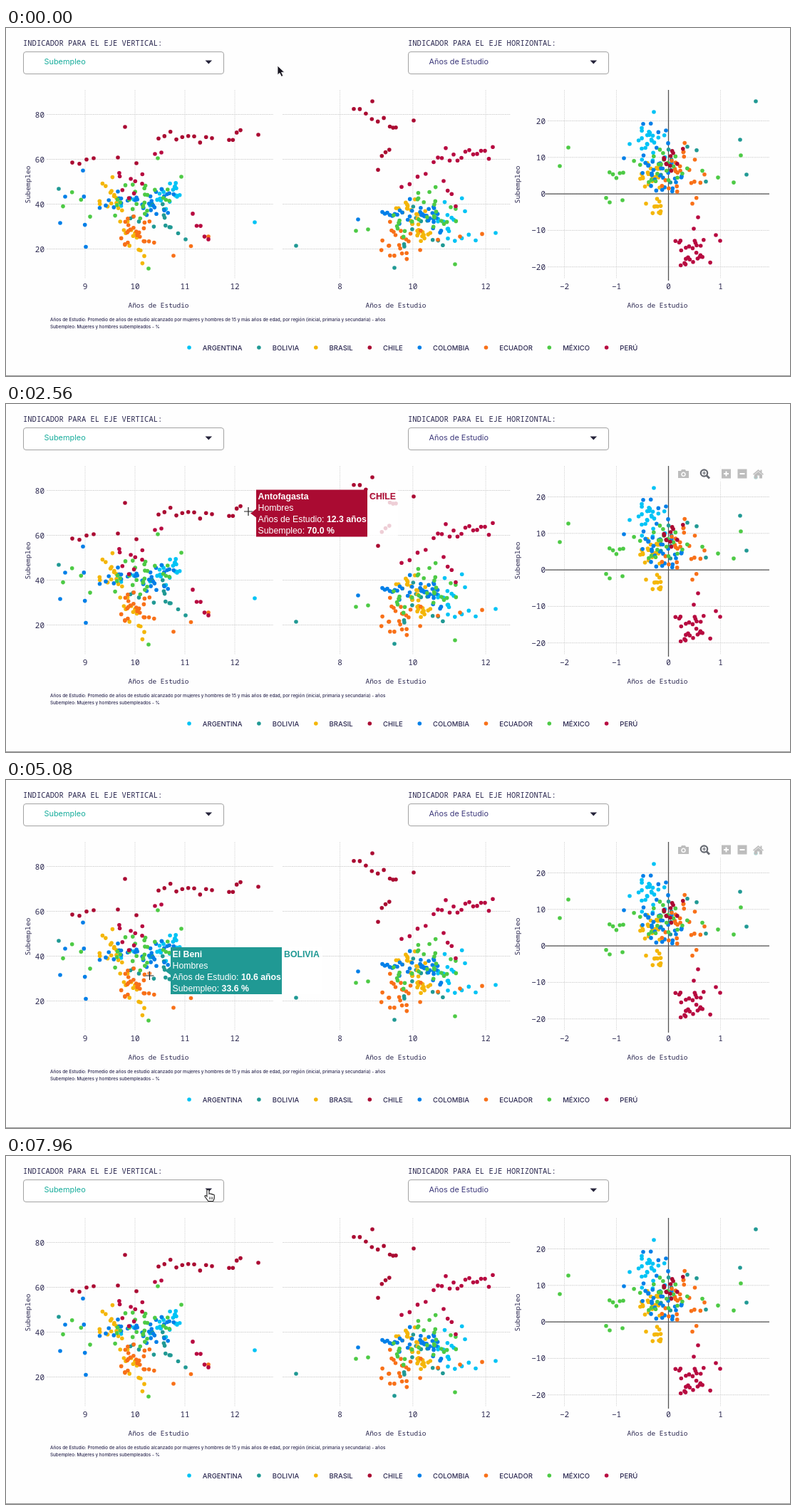
Recreate the animation shown at these times as an HTML page. Size 1100 by 489 pixels, loop 8000 ms.

```html
<!DOCTYPE html>
<html lang="es">
<head>
<meta charset="utf-8">
<title>Indicadores</title>
<style>
html, body { margin: 0; width: 100%; height: 100%; overflow: hidden; background: #fefefe; }
svg { display: block; width: 100vw; height: 100vh; }
text { fill: #2b2850; font-family: Inter, "Open Sans", sans-serif; font-weight: 500; }
.mono { font-family: "Noto Sans Mono", "DejaVu Sans Mono", monospace; }
.value { font-weight: 400; }
.mid { text-anchor: middle; }
.tip text { font: 12.3px "Liberation Sans", Arial, sans-serif; fill: #fff; }
.tip .bold { font-weight: bold; }
</style>
</head>
<body>
<svg id="stage" viewBox="0 0 1100 489">
  <g id="chart"></g>
  <g id="legend"></g>
  <g id="modebar" fill="#bdbdbd">
    <rect x="938" y="87" width="128" height="22" fill="#fff" opacity=".65"/>
    <path fill-rule="evenodd" d="M943 94h4l1-2h5l1 2h4v10h-15zM950.5 95.5a3.3 3.3 0 1 0 .01 0zM950.5 97a1.8 1.8 0 1 1-.01 0z"/>
    <g fill="none" stroke="#666a72"><circle cx="979.5" cy="97" r="4.7" stroke-width="2.2"/><path d="M983 100.5l4 4" stroke-width="2.8"/><path d="M977 97h5m-2.5-2.5v5" stroke-width="1.2"/></g>
    <path d="M1004 91.5h13v13h-13zM1026.5 91.5h13v13h-13z"/>
    <path d="M1007 98h7m-3.5-3.5v7M1029.5 98h7" stroke="#fff" stroke-width="2"/>
    <path d="M1048 98.5l7.5-6.5 3 2.6v-2h2v3.8l2.5 2.1-1 1.2-6.5-5.5-6.5 5.5zM1050 99.5l5.5-4.6 5.5 4.6v5h-4v-4h-3v4h-4z"/>
  </g>
  <g id="tip" class="tip"></g>
  <g id="arrow"><path d="M0 0V13l3-2.7 2.4 5 2.4-1.1-2.3-4.9h4.2z" fill="#17151f" stroke="#fff" stroke-width=".8"/></g>
  <g id="cross" fill="none"><path d="M-6 0H6M0-6V6" stroke="#fff" stroke-width="2.6" opacity=".7"/><path d="M-6 0H6M0-6V6" stroke="#222" stroke-width="1.2"/></g>
  <g id="hand"><path d="M-1.6 1.2Q0-1 1.5 1.2V6.2q1.5-1 2.5.4 1.5-.8 2.4.7 2-.6 2.4 1.2v4.2L7.2 16.5H.3L-4.6 9.8q.2-2 2.2-.9l.8.9z" fill="#fff" stroke="#222" stroke-width="1.1"/><path d="M2 10.5v3.5M4.2 10.5v3.5M6.3 10.5v3.5" stroke="#222" stroke-width=".8"/></g>
</svg>
<script>
const LOOP = 8000;
const COLORS = {
  ARGENTINA: '#00c3f5', BOLIVIA: '#209994', BRASIL: '#f4b608', CHILE: '#aa0b32',
  COLOMBIA: '#007fe8', ECUADOR: '#f87018', 'MÉXICO': '#4dca45', 'PERÚ': '#b70a40'
};
const byId = id => document.getElementById(id);
const out = [];
const text = (x, y, size, label, cls = '', extra = '') =>
  `<text x="${x}" y="${y}" font-size="${size}" class="${cls}" ${extra}>${label}</text>`;
const line = (x1, y1, x2, y2, color = '#dadada', extra = 'stroke-dasharray="2 .6"') =>
  `<path d="M${x1} ${y1}L${x2} ${y2}" stroke="${color}" ${extra}/>`;
const dot = (x, y, country) => `<circle cx="${x.toFixed(1)}" cy="${y.toFixed(1)}" r="2.8" fill="${COLORS[country]}"/>`;

// Seeded values that fall off evenly on both sides of zero
let seed = 71;
const random = () => (seed = (seed * 16807) % 2147483647) / 2147483647;
const spread = () => (random() + random() - 1) * 2.2;

function cloud(country, cx, cy, width, height, count) {
  for (let i = 0; i < count; i++) out.push(dot(cx + spread() * width, cy + spread() * height, country));
}

// Evenly spaced dots from one end to the other, shaken vertically
function trail(country, x1, y1, x2, y2, count, shake = 0) {
  for (let i = 0; i < count; i++) {
    const p = i / (count - 1);
    out.push(dot(x1 + (x2 - x1) * p, y1 + (y2 - y1) * p + spread() * shake, country));
  }
}

const point = (country, x, y) => out.push(dot(x, y, country));

function selector(x, heading, value, color) {
  out.push(text(x, 24.5, 10.5, heading, 'mono value'),
    `<rect x="${x + .5}" y="33.5" width="281" height="31" rx="3.5" fill="#fff" stroke="#a3a3a3"/>`,
    text(x + 29.5, 51, 10.9, value, 'value', `style="fill:${color}"`),
    `<path d="M${x + 255.5} 45.5h9.6l-4.8 5z" fill="#25233a"/>`);
}

const signed = value => String(value).replace('-', '−');

// x and y give the first tick's position, the gap, the first label, its step and the count
function axes(left, right, x, y, titleX, labelX) {
  for (let i = 0; i < x.count; i++) {
    const at = x.at + i * x.gap;
    out.push(line(at, 87, at, 352, '#e2e2e2'), text(at, 367, 11, signed(x.from + i * x.step), 'mono value mid'));
  }
  for (let i = 0; i < y.count; i++) {
    const at = y.at + i * y.gap;
    out.push(line(left, at, right, at));
    if (labelX) out.push(text(left - 3, at + 4, 11, signed(y.from + i * y.step), 'mono value', 'text-anchor="end"'));
  }
  out.push(text(titleX, 392.5, 9.45, 'Años de Estudio', 'mono value mid'));
  if (labelX) out.push(text(0, 0, 9.8, 'Subempleo', 'mono value mid', `transform="translate(${labelX} 220) rotate(-90)"`));
}

selector(24, 'INDICADOR PARA EL EJE VERTICAL:', 'Subempleo', '#18ad9c');
selector(564, 'INDICADOR PARA EL EJE HORIZONTAL:', 'Años de Estudio', '#3d397b');

const percent = { at: 121.5, gap: 63, from: 80, step: -20, count: 4 };
axes(57, 375, { at: 111, gap: 70, from: 9, step: 1, count: 4 }, percent, 214, 34);
axes(388, 708, { at: 468.5, gap: 102.3, from: 8, step: 2, count: 3 }, percent, 547);
axes(760, 1071, { at: 783.5, gap: 73, from: -2, step: 1, count: 4 },
  { at: 130.5, gap: 51.3, from: 20, step: -10, count: 5 }, 914, 720.5);
out.push(line(929.5, 87, 929.5, 355, '#555', 'stroke-width="1.3"'), line(757, 233.2, 1071, 233.2, '#555', 'stroke-width="1.3"'));

// Men
cloud('ARGENTINA', 230, 228, 10, 10, 14);
cloud('ARGENTINA', 200, 244, 20, 8, 7);
point('ARGENTINA', 349, 273);
cloud('BOLIVIA', 205, 265, 22, 21, 12);
trail('BOLIVIA', 231, 280, 252, 297, 3);
point('BOLIVIA', 74, 226);
cloud('BRASIL', 148, 233, 9, 11, 12);
trail('BRASIL', 155, 252, 194, 320, 16, 13);
trail('COLOMBIA', 108, 200, 112, 301, 4, 8);
cloud('COLOMBIA', 163, 243, 16, 8, 12);
cloud('COLOMBIA', 210, 246, 17, 12, 20);
trail('COLOMBIA', 76, 274, 83, 237, 2);
cloud('ECUADOR', 183, 289, 14, 13, 24);
trail('ECUADOR', 235, 320, 284, 293, 3);
trail('MÉXICO', 80, 238, 118, 266, 4, 12);
cloud('MÉXICO', 187, 238, 23, 19, 25);
trail('MÉXICO', 213, 183, 246, 209, 2);
point('MÉXICO', 200, 338);
trail('CHILE', 93, 190, 123, 182, 4, 4);
trail('CHILE', 157, 182, 183, 190, 2);
trail('CHILE', 214, 156, 289, 151, 10, 5);
trail('CHILE', 313, 155, 329, 145, 4, 4);
point('CHILE', 354, 150);
point('CHILE', 167, 139);
trail('PERÚ', 209, 177, 218, 175, 2);
cloud('PERÚ', 182, 228, 18, 17, 9);
trail('PERÚ', 262, 252, 284, 280, 5, 13);

// Women
cloud('ARGENTINA', 615, 264, 15, 14, 14);
trail('ARGENTINA', 620, 298, 659, 293, 5, 5);
point('ARGENTINA', 687, 288);
cloud('BOLIVIA', 578, 280, 18, 19, 12);
point('BOLIVIA', 407, 306);
point('BOLIVIA', 545, 337);
cloud('BRASIL', 567, 256, 10, 9, 13);
cloud('BRASIL', 582, 289, 9, 19, 15);
trail('COLOMBIA', 528, 262, 556, 259, 9, 3);
cloud('COLOMBIA', 590, 264, 18, 12, 27);
point('COLOMBIA', 494, 269);
cloud('ECUADOR', 555, 303, 18, 14, 23);
trail('ECUADOR', 606, 297, 668, 287, 3, 3);
cloud('MÉXICO', 600, 259, 20, 17, 22);
cloud('MÉXICO', 553, 273, 14, 12, 6);
trail('MÉXICO', 491, 285, 508, 283, 2);
point('MÉXICO', 630, 332);
trail('CHILE', 488, 118, 547, 134, 8, 8);
trail('CHILE', 522, 186, 543, 152, 5, 9);
point('CHILE', 514, 103);
point('CHILE', 572, 130);
trail('PERÚ', 555, 213, 600, 191, 5, 8);
trail('PERÚ', 606, 180, 683, 171, 15, 6);
trail('PERÚ', 614, 212, 631, 238, 4, 8);

// Gap between the two
cloud('ARGENTINA', 904, 160, 10, 20, 22);
trail('ARGENTINA', 875, 163, 909, 118, 3);
cloud('BOLIVIA', 926, 198, 13, 15, 6);
trail('BOLIVIA', 956, 163, 982, 202, 3, 10);
trail('BOLIVIA', 1030, 157, 1039, 206, 2);
point('BOLIVIA', 1052, 103);
cloud('BRASIL', 905, 201, 9, 10, 19);
cloud('BRASIL', 910, 245, 8, 13, 13);
trail('COLOMBIA', 894, 132, 926, 145, 4, 6);
cloud('COLOMBIA', 920, 202, 15, 19, 30);
point('COLOMBIA', 867, 183);
cloud('ECUADOR', 943, 200, 16, 22, 20);
trail('ECUADOR', 963, 254, 980, 201, 4, 6);
trail('MÉXICO', 777, 194, 789, 168, 2);
trail('MÉXICO', 842, 213, 866, 191, 6, 14);
trail('MÉXICO', 847, 245, 865, 242, 2);
trail('MÉXICO', 977, 204, 1021, 212, 3, 4);
cloud('MÉXICO', 920, 196, 21, 18, 20);
point('MÉXICO', 1031, 179);
cloud('CHILE', 938, 190, 11, 13, 11);
cloud('PERÚ', 961, 314, 15, 13, 25);
trail('PERÚ', 965, 282, 971, 266, 2);
trail('PERÚ', 996, 291, 1002, 299, 2);

out.push(
  text(62, 411.5, 6.3, 'Años de Estudio: Promedio de años de estudio alcanzado por mujeres y hombres de 15 y más años de edad, por región (inicial, primaria y secundaria) - años'),
  text(62, 422, 6.3, 'Subempleo: Mujeres y hombres subempleados - %'),
  line(0, 488.5, 1100, 488.5, '#9b9b9b', ''));
byId('chart').innerHTML = out.join('');

// Each entry starts a fixed gap after the end of the one before
let legendX = 257;
for (const country in COLORS) {
  byId('legend').insertAdjacentHTML('beforeend', dot(legendX, 449, country) + text(legendX + 18.8, 452.7, 9.5, country));
  legendX += 18.8 + byId('legend').lastElementChild.getComputedTextLength() + 23.5;
}

const HOVERS = [
  { from: 1840, to: 2900, x: 343, y: 153.5, country: 'CHILE', region: 'Antofagasta', years: '12.3', rate: '70.0' },
  { from: 3000, to: 3900, x: 253, y: 160, country: 'CHILE', region: 'Aysén', years: '11.0', rate: '67.7' },
  { from: 4700, to: 5700, x: 223, y: 268, country: 'BOLIVIA', region: 'El Beni', years: '10.6', rate: '33.6' },
  { from: 5700, to: 7100, x: 194.7, y: 274.5, country: 'BOLIVIA', region: 'Cochabamba', years: '10.2', rate: '31.5' }
];
// Pointer stops as [time, x, y]
const PATH = [
  [0, 381, 53], [1200, 381, 53], [1900, 355, 150], [2560, 340, 151], [3400, 251, 159], [3800, 250, 160],
  [5000, 201.5, 275], [6400, 197, 277], [7050, 197, 277], [7760, 283.5, 47], [LOOP, 283.5, 47]
];

function tooltip({ x, y, country, region, years, rate }) {
  const left = x + 8, right = left + 156, top = y - 33;
  const color = COLORS[country];
  const row = (i, label) => text(left + 2.5, top + 13.5 + i * 16, 12.3, label);
  const bold = label => `<tspan class="bold">${label}</tspan>`;
  const nameWidth = country.length * 7 + 8;
  return `<rect x="${right}" y="${top}" width="${nameWidth}" height="66" fill="#fff" opacity=".8"/>` +
    `<path d="M${x} ${y}l8-6V${top}H${right}v66H${left}V${y + 6}z" fill="${color}"/>` +
    row(0, bold(region)) + row(1, 'Hombres') +
    row(2, `Años de Estudio: ${bold(years + ' años')}`) + row(3, `Subempleo: ${bold(rate + ' %')}`) +
    text(right + 3, top + 13.5, 12.3, country, 'bold', `style="fill:${color}"`);
}

function pointerAt(t) {
  const i = PATH.findIndex(([time], k) => k && t <= time);
  const [t0, x0, y0] = PATH[i - 1], [t1, x1, y1] = PATH[i];
  const p = (t - t0) / (t1 - t0), eased = p * p * (3 - 2 * p);
  return [x0 + (x1 - x0) * eased, y0 + (y1 - y0) * eased];
}

let shown;
function draw(t) {
  const [x, y] = pointerAt(t);
  const inPlot = y > 87;
  const cursor = inPlot ? 'cross' : x < 306 && y < 65 ? 'hand' : 'arrow';
  for (const id of ['arrow', 'cross', 'hand']) {
    byId(id).style.display = id === cursor ? '' : 'none';
    byId(id).setAttribute('transform', `translate(${x} ${y})`);
  }
  byId('modebar').style.display = inPlot ? '' : 'none';
  const hover = HOVERS.find(h => t >= h.from && t < h.to);
  if (hover !== shown) byId('tip').innerHTML = hover ? tooltip(hover) : '';
  shown = hover;
}

const start = performance.now();
function tick() {
  draw((performance.now() - start) % LOOP);
  requestAnimationFrame(tick);
}
tick();
</script>
</body>
</html>
```
